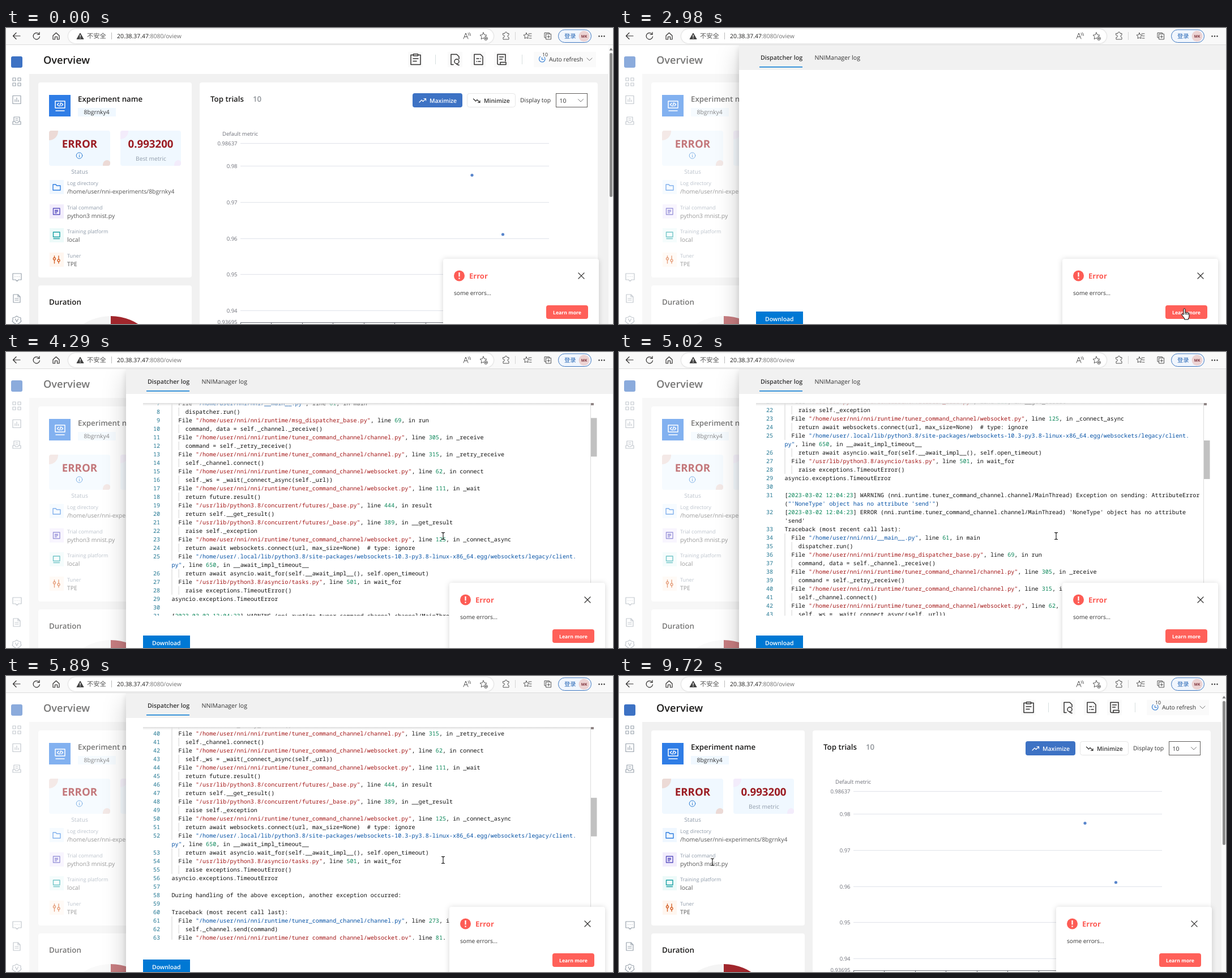
Recreate the animation shown at these times as an HTML page. Size 1072x522 px, loop 9.79 s.

```html
<!DOCTYPE html>
<html lang="en">
<meta charset="utf-8">
<title>Experiment overview</title>
<style>
html, body { margin: 0; width: 100%; height: 100%; overflow: hidden; background: #fff }
svg { display: block; font: 10.4px "Open Sans", sans-serif; text-rendering: geometricPrecision; fill: #333 }
text { white-space: pre }
.line { fill: none; stroke: #323130; stroke-width: 1.2; stroke-linecap: round; stroke-linejoin: round }
.title { font-size: 13.3px; font-weight: 600; fill: #1b1a19 }
.strong { font-weight: 600 }
.value { font-size: 18.7px; font-weight: 700; fill: #9b1c22; text-anchor: middle }
.label { font-size: 9px; fill: #8f9baa }
.muted { font-size: 10.2px; fill: #8f9baa; text-anchor: middle }
.body { fill: #555 }
.axis { font-size: 9.5px; fill: #6e7079 }
.white { fill: #fff; font-weight: 600 }
#log { font: 10.11px "Noto Sans Mono", monospace; fill: #111 }
#log .num { fill: #237893; text-anchor: end }
</style>
<body>
<svg width="1072" height="522" viewBox="0 0 1072 522">
<defs>
  <clipPath id="editorClip"><rect x="242" y="90" width="802" height="375"/></clipPath>
  <linearGradient id="topShade" x2="0" y2="1"><stop stop-color="#ddd"/><stop offset="1" stop-color="#ddd" stop-opacity="0"/></linearGradient>
</defs>

<g id="page">
  <path fill="#fff" d="M0 30H1072V522H0z"/>
  <path fill="#f1f1f1" d="M41 81H1064V522H41z"/>
  <path fill="#fafafa" d="M1064 30h8v492h-8z"/>
  <rect x="1066" y="44" width="5" height="254" rx="2.5" fill="#8b8b8b"/>
  <path fill="#777" d="M1065.500 39.500l3-4.500 3 4.500z"/>
  <g fill="#fff">
    <rect x="57" y="96" width="271" height="344" rx="4"/>
    <rect x="57" y="454" width="271" height="90" rx="4"/>
    <rect x="342" y="96" width="703" height="440" rx="4"/>
  </g>

  <rect x="9" y="50" width="20" height="20" rx="3" fill="#3d72c4"/>
  <g class="line" style="stroke:#9aa3ad">
    <path d="M12 88h5v5h-5zM21 88h5v5h-5zM12 97h5v5h-5zM21 97h5v5h-5z"/>
    <path d="M12 119.500h14v14H12zM16 130v-4M19 130v-7M22 130v-3"/>
    <path d="M14 165v-8h10v8M12 165h4l1 2h4l1-2h4v5H12zM17 160h4M17 163h4"/>
    <path d="M12 433h15v11h-5l-2.500 2.500-2.500-2.500h-5zM16 438.500h.1M19.500 438.500h.1M23 438.500h.1"/>
    <path d="M13 470h8l4 4v10H13zM21 470v4h4M16 477h6M16 480h6"/>
    <path d="M19 508l3 2 4 1v4l1 2-3 3-5 3-5-3-3-3 1-2v-4l4-1zM16.500 513l2.500 5 2.500-5"/>
  </g>

  <text x="66" y="63" style="font-size:18.2px;font-weight:600;fill:#1b1a19">Overview</text>
  <g fill="#fafafa"><path d="M710 42h26v27h-26zM780 42h26v27h-26zM821 42h26v27h-26zM862 42h26v27h-26zM932 42h110v27H932z"/></g>
  <path stroke="#d7dfdf" d="M758.500 47v17M911.500 47v17"/>
  <g class="line" style="stroke-width:1.500">
    <path d="M719 47.500h-4v17h17v-17h-4M719.500 46h8v3h-8zM719 54h9M719 58.500h6"/>
    <path d="M790 64.500h-4v-18h10l4 4v4M796 64l4 1.500"/><circle cx="796" cy="59" r="4"/>
    <path d="M827 46.500h11l4 4v14h-15zM831 54h4M838 54h.5M831 59h.5M834 59h4"/>
    <path d="M868 46.500h14v12M868 46.500v16q0 2 2 2h13v-4h-10v4M871.500 51h7M871.500 55h5"/>
  </g>
  <g class="line" style="stroke:#3b82d6"><path d="M951 51.500a5.300 5.300 0 1 1-7.500-1M946.500 52v3.500h3"/></g>
  <text x="947" y="50" style="font-size:8.8px">10</text>
  <text x="959" y="59">Auto refresh</text>
  <path class="line" style="stroke:#777;stroke-width:1" d="M1026 53l4.500 4.500 4.500-4.500"/>

  <rect x="76" y="118" width="38" height="38" fill="#2f7de6"/>
  <g class="line" style="stroke:#fff;stroke-width:1.500"><path d="M87 129h17v12H87zM88 146h15M93 132.500l-2.500 2.500 2.500 2.500M98 132.500l2.500 2.500-2.500 2.500M96.500 132l-1.500 6"/></g>
  <text class="title" x="127" y="130">Experiment name</text>
  <rect x="127" y="141" width="67" height="15" fill="#f0f8ff"/>
  <text x="137.500" y="152">8bgrnky4</text>
  <g fill="#f0f8ff"><rect x="76" y="181" width="108" height="62" rx="4"/><rect x="202" y="181" width="107" height="62" rx="4"/></g>
  <path fill="#ecdad6" d="M76 185q0-4 4-4h12a16 16 0 0 1-16 17zM171 243a7.500 9 0 0 1 13-7v3q0 4-4 4z"/>
  <path fill="#f3ecfb" d="M202 185q0-4 4-4h10a14 14 0 0 1-14 15zM297 243a7 9 0 0 1 12-7v3q0 4-4 4z"/>
  <text class="value" x="130" y="211">ERROR</text>
  <text class="value" x="255.500" y="211">0.993200</text>
  <g class="line" style="stroke:#2b7cd3;stroke-width:1"><circle cx="129.500" cy="225" r="5.300"/><path d="M129.500 224.500v3M129.500 222.300v.1"/></g>
  <text class="muted" x="256" y="233.500">Best metric</text>
  <text class="muted" x="130" y="257">Status</text>

  <path fill="#eff7ff" d="M77 268h25v25H77z"/><path fill="#f2edfc" d="M77 311h25v25H77z"/>
  <path fill="#edfaf9" d="M77 353h25v25H77z"/><path fill="#fff6ef" d="M77 396h25v25H77z"/>
  <g class="line" style="stroke-width:1.400">
    <path style="stroke:#2f7de0" d="M83 276h5l1.500 2H96v8H83z"/>
    <path style="stroke:#5a50c0" d="M83.500 318h11.500v11H83.500zM86.500 321.500h5M86.500 323.500h5M86.500 326h3"/>
    <path style="stroke:#18a0a4" d="M83.500 360h11.500v8.500H83.500zM84 371.500h10.500"/>
    <path style="stroke:#d5642c" d="M85.500 402v3M85.500 409v6M93 402v6M93 412v3"/>
    <circle style="stroke:#d5642c" cx="85.500" cy="407" r="2"/><circle style="stroke:#d5642c" cx="93" cy="410" r="2"/>
  </g>
  <text class="label" x="108" y="277">Log directory</text><text class="body" x="108" y="291.500">/home/user/nni-experiments/8bgrnky4</text>
  <text class="label" x="108" y="319.500">Trial command</text><text class="body" x="108" y="334.500">python3 mnist.py</text>
  <text class="label" x="108" y="362">Training platform</text><text class="body" x="108" y="377">local</text>
  <text class="label" x="108" y="404.500">Tuner</text><text class="body" x="108" y="419.500">TPE</text>

  <text class="title" x="76" y="488">Duration</text>
  <circle cx="185" cy="598" r="90" fill="#f4f4f4"/>
  <path fill="#a1262c" d="M185 508a90 90 0 0 1 90 90h-90z"/>

  <text class="title" x="361" y="130">Top trials</text>
  <text class="title" x="436" y="130" style="fill:#8f9499">10</text>
  <rect x="718" y="115" width="88" height="25" rx="4" fill="#3d72c4"/>
  <path class="line" style="stroke:#fff" d="M730 131l4-4 2.500 2.500 5-5M738 124.500h3.500v3.500"/>
  <text class="white" x="748" y="131.500">Maximize</text>
  <rect x="814.500" y="115.500" width="85" height="24" rx="4" fill="#fff" stroke="#e6e6e6"/>
  <path class="line" d="M825.500 125l4 4 2.500-2.500 5 5M833.500 131.500h3.500V128"/>
  <text class="strong" x="844" y="131.500">Minimize</text>
  <text x="908" y="131">Display top</text>
  <rect x="971.500" y="115.500" width="55" height="24" fill="#fff" stroke="#605e5c"/>
  <text x="977.500" y="131.500">10</text>
  <path class="line" style="stroke:#777;stroke-width:1" d="M1010.500 125.500l4.500 4.500 4.500-4.500"/>

  <text class="axis" x="382" y="189.500">Default metric</text>
  <g id="chart"></g>
  <path fill="none" stroke="#6e7079" d="M414 519.500H959M414.500 519v5M468.500 519v5M523.500 519v5M577.500 519v5M632.500 519v5M686.500 519v5M741.500 519v5"/>
  <g fill="#5a86cc"><circle cx="823" cy="259.500" r="2.600"/><circle cx="877.500" cy="364" r="2.600"/></g>
</g>

<g id="drawer">
  <path fill="#fff" opacity=".4" d="M0 30H1072V522H0z"/>
  <g id="panel">
    <path fill="#fff" style="filter:drop-shadow(0 4px 6px rgba(0,0,0,.13)) drop-shadow(0 16px 20px rgba(0,0,0,.2))" d="M212 30h910v500H212z"/>
    <path fill="#f1f1f1" d="M212 30h910v44H212z"/>
    <text class="strong" x="250" y="56" style="font-size:10.700px">Dispatcher log</text>
    <text x="345.500" y="56" style="font-size:10.600px">NNIManager log</text>
    <path fill="#0078d4" d="M248 68h76v1.600h-76zM242 500h83v30h-83z"/>
    <text class="white" x="258" y="516.500">Download</text>
    <g id="editor" clip-path="url(#editorClip)">
      <g id="log"></g>
      <rect id="shade" x="242" y="90" width="791" height="5" fill="url(#topShade)"/>
      <path stroke="#ddd" d="M1032.500 90v375"/>
      <path fill="#8f8585" d="M1033 90h5v4h-5z"/>
      <rect id="slider" x="1033" y="90" width="10.500" height="68" fill="#646464"/>
    </g>
  </g>
</g>

<g id="toast">
  <rect x="772" y="407" width="275" height="140" rx="4" fill="#fff" style="filter:drop-shadow(0 1px 5px rgba(0,0,0,.17))"/>
  <circle cx="800.500" cy="437" r="9.500" fill="#fd5c55"/>
  <path stroke="#fff" stroke-width="2.200" d="M800.500 431v7.500M800.500 440.500v2.300"/>
  <text x="818" y="442" style="font-size:13px;font-weight:700;fill:#fd5c55">Error</text>
  <path class="line" d="M1011 432l10 10M1021 432l-10 10"/>
  <text x="791" y="470.500" style="font-size:10.200px">some errors...</text>
  <rect x="954" y="489" width="74" height="24" rx="4" fill="#ff6059"/>
  <text x="991" y="504.500" style="font-size:8.700px;font-weight:700;fill:#fff;text-anchor:middle">Learn more</text>
</g>

<g id="browser">
  <path fill="#f9f9f9" d="M0 0H1072V30H0z"/><path stroke="#dcdcdc" d="M0 29.500H1072"/>
  <rect x="110" y="2" width="751" height="25" rx="12.500" fill="#fff" style="filter:drop-shadow(0 0 1px #bbb)"/>
  <g class="line">
    <path d="M25 14H12.500M18 8.500L12.500 14l5.500 5.500"/>
    <path d="M58.500 11A5.700 5.700 0 1 0 59.500 15M59 7.500v4h-4"/>
    <path d="M83 13.500l5.500-5 5.500 5V20h-3.500v-4.500h-4V20H83z"/>
  </g>
  <path fill="#444" stroke="#444" stroke-linejoin="round" d="M131 9l6 10.500h-12z"/><path stroke="#fff" stroke-width="1.300" d="M131 12v4M131 17v1.400"/>
  <text x="143" y="18" style="font:11.300px 'Noto Sans CJK SC','Noto Sans CJK',sans-serif;fill:#555">不安全</text>
  <path stroke="#bbb" d="M186.500 8v12"/>
  <text x="196" y="18" style="fill:#1b1a19">20.38.37.47<tspan fill="#707070">:8080/oview</tspan></text>
  <g class="line" style="stroke-width:1;stroke:#555">
    <path d="M808 19l4-10 4 10M809.500 15.500h5M816 9q2 1.500 1.500 4M818 8q3 2 2.300 5.500"/>
    <path d="M843 8l1.900 4 4.100.5-3 2.900.8 4.300-3.800-2-3.800 2 .8-4.300-3-2.900 4.100-.5z"/>
    <circle cx="847.500" cy="18.500" r="3" fill="#fff"/><path d="M846 18.500h3M847.500 17v3"/>
    <path d="M878 9.500h3q0-2.500 2-2.500t2 2.500h3v3q-2 0-2 2t2 2V20h-10v-3.500q2.500 0 2.500-2t-2.500-2z"/>
    <path d="M919 8.500l1.500 3.500 3.500.3-2.500 2.700.5 3.500-3-1.500-3 1.500.5-3.500-2.500-2.700 3.500-.3zM923 10h5M924.500 14h3.500M924 18h4"/>
    <path d="M953 17h-2V8.500h8.500V10M954 10.500h8.500V20H954zM958.300 13v4.500M956 15.300h4.500"/>
  </g>
  <path stroke="#d5d5d5" d="M899.500 7v14"/>
  <rect x="975.500" y="3" width="58" height="22.500" rx="11.200" fill="#f1f6fd" stroke="#3f78c0"/>
  <text x="986" y="18" style="font:10.300px 'Noto Sans CJK SC','Noto Sans CJK',sans-serif;fill:#2264b5">登录</text>
  <circle cx="1021" cy="14.500" r="9.500" fill="#ecd3d3"/>
  <text x="1021" y="17" style="font-size:6.500px;font-weight:700;fill:#7c2f38;text-anchor:middle">MK</text>
  <g fill="#333"><circle cx="1047.500" cy="14.500" r="1.200"/><circle cx="1052" cy="14.500" r="1.200"/><circle cx="1056.500" cy="14.500" r="1.200"/></g>
</g>

<g id="pointer" stroke-linejoin="round">
  <path id="arrow" fill="#fff" stroke="#000" d="M0 0v14l3.300-3 2.200 5 2.200-1-2.200-4.800h4.500z"/>
  <path id="hand" fill="#fff" stroke="#000" d="M-1.500 1.500q0-1.500 1.500-1.500t1.500 1.500V7q1-1 2.500 0 1.500-.8 2.500.5 2-.5 2 1.500v4q0 3-1.500 4v2h-7v-2l-4.500-6q-.8-2 1-2l2 1.500zM1.500 7v3.500M4 7.500v3M6.500 8.500v2.500"/>
  <path id="beam" fill="none" stroke="#111" stroke-width="1.100" d="M-3-6h2l1 1 1-1h2M0-5V5M-3 6h2l1-1 1 1h2"/>
</g>
</svg>

<script>
const LOOP = 9790, ROW = 15, CHAR = 6.066, LEFT = 292.5;
const $ = id => document.getElementById(id);
const clamp = v => Math.max(0, Math.min(1, v));
const easeOut = v => 1 - (1 - clamp(v)) ** 3;

// Chart grid
const levels = [[204, "0.98637"], [244, "0.98"], [308, "0.97"], [372, "0.96"], [435, "0.95"], [499, "0.94"]];
$("chart").innerHTML = levels.map(([y, label]) =>
  `<path stroke="#e0e3ea" d="M414 ${y - .5}H959"/><text class="axis" text-anchor="end" x="408.500" y="${y + 2.5}">${label}</text>`
).join("") + `<text class="axis" text-anchor="end" x="408.500" y="521.500">0.93695</text>`;

// Log text; "\n" marks a wrapped row
const NNI = "/home/user/nni/nni/", PY = "/usr/lib/python3.8/";
const CHANNEL = NNI + "runtime/tuner_command_channel/channel.py";
const SOCKET = NNI + "runtime/tuner_command_channel/websocket.py";
const BASE = PY + "concurrent/futures/_base.py";
const file = (path, line, fn, code) => [`  File "${path}", line ${line}, in ${fn}`, "    " + code];
const entry = (time, level, unit, message) => `[2023-03-02 ${time}] ${level} (nni.${unit}/MainThread) ${message}`;
const TUNER = "runtime.tuner_command_channel.channel", DISPATCH = "runtime.msg_dispatcher_base";
const TRACEBACK = "Traceback (most recent call last):";
const trace = [
  ...file(NNI + "__main__.py", 61, "main", "dispatcher.run()"),
  ...file(NNI + "runtime/msg_dispatcher_base.py", 69, "run", "command, data = self._channel._receive()"),
  ...file(CHANNEL, 305, "_receive", "command = self._retry_receive()"),
  ...file(CHANNEL, 315, "_retry_receive", "self._channel.connect()"),
  ...file(SOCKET, 62, "connect", "self._ws = _wait(_connect_async(self._url))"),
  ...file(SOCKET, 111, "_wait", "return future.result()"),
  ...file(BASE, 444, "result", "return self.__get_result()"),
  ...file(BASE, 389, "__get_result", "raise self._exception"),
  ...file(SOCKET, 125, "_connect_async", "return await websockets.connect(url, max_size=None)  # type: ignore"),
  ...file("/home/user/.local/lib/python3.8/site-packages/websockets-10.3-py3.8-linux-x86_64.egg/websockets/legacy/client.\npy",
    650, "__await_impl_timeout__", "return await asyncio.wait_for(self.__await_impl__(), self.open_timeout)"),
  ...file(PY + "asyncio/tasks.py", 501, "wait_for", "raise exceptions.TimeoutError()"),
  "asyncio.exceptions.TimeoutError", ""
];
const lines = [
  entry("10:36:35", "INFO", "tuner.tpe", "Using random seed 1605425262"),
  entry("10:36:35", "INFO", DISPATCH, "Dispatcher started"),
  entry("12:03:57", "WARNING", TUNER, "Exception on receiving:\nConnectionClosedError(None, Close(code=1011, reason='keepalive ping timeout'), None)"),
  entry("12:03:57", "WARNING", TUNER, "Connection lost. Trying to\nreconnect..."),
  entry("12:03:57", "INFO", TUNER, "Attempt #0, wait 0 seconds..."),
  entry("12:04:22", "INFO", DISPATCH, "Report error to NNI manager: Traceback (most\nrecent call last):"),
  ...trace,
  entry("12:04:23", "WARNING", TUNER, `Exception on sending: AttributeError\n("'NoneType' object has no attribute 'send'")`),
  entry("12:04:23", "ERROR", TUNER, "'NoneType' object has no attribute\n'send'"),
  TRACEBACK, ...trace,
  "During handling of the above exception, another exception occurred:", "",
  TRACEBACK,
  ...file(CHANNEL, 273, "_send", "self._channel.send(command)"),
  ...file(SOCKET, 81, "send", "_wait(self._ws.send(message))"),
  "AttributeError: 'NoneType' object has no attribute 'send'",
  entry("12:04:26", "WARNING", TUNER, "Connection lost. Trying to\nreconnect...")
];

function buildLog() {
  let row = 0;
  let out = `<path fill="none" stroke="#eee" stroke-width="1.500" d="M293 90.700H1033M293 104.300H1033"/>` +
    [0, 20].map(col => `<rect x="${LEFT + col * CHAR}" y="91" width="6" height="13" fill="#e6f0e6" stroke="#b9b9b9"/>`).join("");
  lines.forEach((line, i) => {
    const afterHeader = i > 0 && lines[i - 1].endsWith("call last):");
    const stringColor = afterHeader || /site-packages|sending/.test(line) ? "#0451a5" : "#a31515";
    const tokens = line.match(/"[^"]*"|\b\d[\d:-]*\b|[^"\d]+|./g) || [];
    const markup = tokens.map(token => {
      const color = token[0] === '"' ? stringColor : /^\d/.test(token) ? "#098658" : "#111";
      return token.split("\n").map(part => `<tspan fill="${color}">${part}</tspan>`).join("\n");
    }).join("");
    const top = 90 + row * ROW, indent = line.search(/\S/);
    for (let col = 0; col < indent; col += 2)
      out += `<path stroke="#d3d3d3" d="M${293 + col * CHAR} ${top}v${ROW}"/>`;
    out += `<text class="num" x="272" y="${top + 11}">${i + 1}</text>`;
    for (const part of markup.split("\n"))
      out += `<text x="${LEFT}" y="${90 + row++ * ROW + 11}">${part}</text>`;
  });
  $("log").innerHTML = out;
}
buildLog();

// Pointer path: time, x, y
const path = [
  [1140, 1066, 516], [1550, 1028, 507], [2050, 999, 495], [2120, 998.5, 495], [3400, 998.5, 495],
  [3700, 830, 362], [3890, 772, 324.5], [6240, 772, 324.5], [6600, 640, 408], [6820, 520, 428],
  [7260, 254, 302], [7470, 171, 323], [7630, 165, 328], [LOOP, 165, 328]
];
function pointerAt(t) {
  const i = Math.max(1, path.findIndex(p => p[0] > t));
  const [a, b] = [path[i - 1], path[i]], k = clamp((t - a[0]) / (b[0] - a[0]));
  return [a[1] + (b[1] - a[1]) * k, a[2] + (b[2] - a[2]) * k];
}
function pointerShape(t, x, y) {
  if (t < 1140 || (t >= 9120 && t < 9720)) return "";
  if (t >= 9720) return "beam";
  if (t < 3460) return x < 1028 && y < 513 ? "hand" : "arrow";
  if (x < 212) return "hand";
  return x > 292 && x < 1033 && y < 465 ? "beam" : "arrow";
}

// Wheel scrolls: first visible step, and how far into the 125 ms glide it falls.
// The screen is sampled every STEP ms and holds still in between.
const wheels = [[4150, 26], [4630, 26], [5020, 26], [5420, 44], [5890, 44]];
const NOTCH = 142, GLIDE = 125, STEP = 65;
function scrollAt(t) {
  return Math.round(wheels.reduce((sum, [start, lead]) => t < start ? sum :
    sum + NOTCH * easeOut((lead + STEP * Math.floor((t - start) / STEP)) / GLIDE), 0));
}

function render(t) {
  const shown = t < 8000 ? easeOut((t - 2580) / 367) : 1 - clamp((t - 8950) / 170);
  $("drawer").setAttribute("opacity", shown);
  $("panel").setAttribute("transform", `translate(${40 * (1 - shown)})`);
  $("toast").setAttribute("transform", `translate(${shown > 0 ? 11 : 0})`);
  $("editor").setAttribute("opacity", t < 2990 ? 0 : 1);

  const scroll = scrollAt(t);
  $("log").setAttribute("transform", `translate(0 ${-scroll})`);
  $("shade").setAttribute("opacity", scroll > 0 ? 1 : 0);
  $("slider").setAttribute("y", 90 + scroll * .186);
  $("slider").setAttribute("opacity", t < 7840 ? .4 : t < 8120 ? .2 : 0);

  const [x, y] = pointerAt(t), shape = pointerShape(t, x, y);
  $("pointer").setAttribute("transform", `translate(${x} ${y})`);
  for (const id of ["arrow", "hand", "beam"]) $(id).style.display = id === shape ? "" : "none";
}

const began = performance.now();
function tick() {
  render((performance.now() - began) % LOOP);
  requestAnimationFrame(tick);
}
tick();
</script>
</body>
</html>
```
